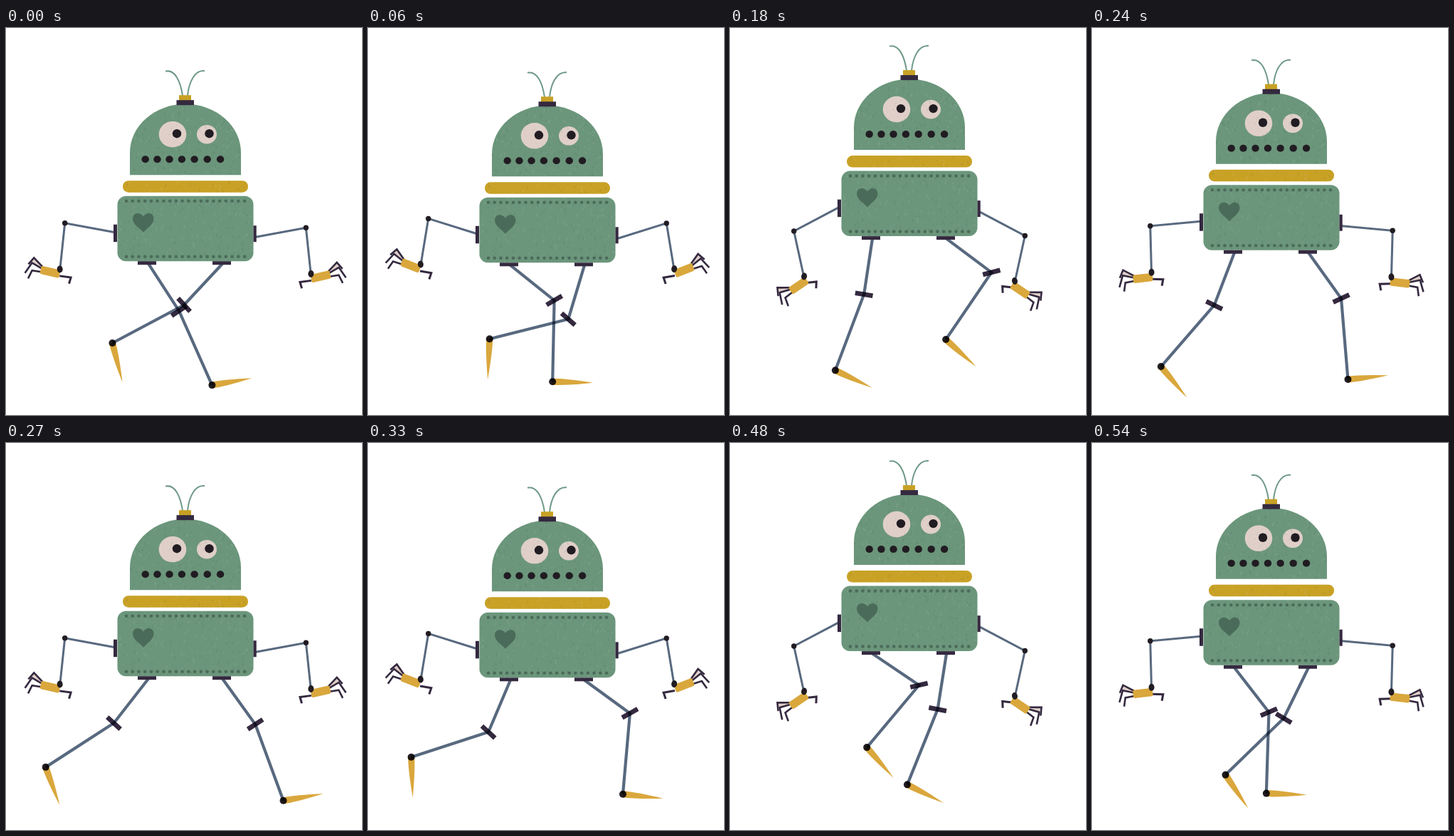
These frames come from a looping animation (500x543 px, 570 ms). An HTML page with a canvas:

```html
<!DOCTYPE html>
<html lang="en">
<head>
<meta charset="utf-8">
<title>Running robot</title>
<style>
  html, body { margin: 0; width: 100%; height: 100%; overflow: hidden; background: #fff; }
  canvas { display: block; }
</style>
</head>
<body>
<canvas id="stage" width="500" height="543"></canvas>
<script>
const ctx = document.getElementById('stage').getContext('2d');
const GREEN = '#6b967b', MOSS = '#4b6b5a', GOLD = '#c8a125', AMBER = '#d9a73c';
const PLUM = '#34293f', INK = '#211c22', STEEL = '#58697f', PALE = '#dfcfc8';
const RAD = Math.PI / 180, STEP = 30, STEPS = 19, HELD = 11, STRIDE = 18;
const THIGH = 79, SHIN = 114, FOOT = 57, UPPER_ARM = 71.5, FOREARM = 66;
const LEG_LAG = 9.3;

// Key poses of one stride, shared by both legs: step, thigh angle, shin angle.
const gait = [
  [0, 33, 24], [2.3, 54, -5], [3.3, 26, -2], [4, -6, -12], [6.3, -9, -22], [8, -21, -41],
  [9.3, -43, -62], [11, -23, -72], [12, -2, -85], [13.3, 7, -91], [15, 56, -40],
  [17.2, 36, 2], [STRIDE, 33, 24]
];

let seed = 7;
const random = () => (seed = seed * 16807 % 2147483647) / 2147483647;
const flecks = Array.from({ length: 700 }, () =>
  [150 + random() * 205, 100 + random() * 235, random() * 5 - 2.5, random() * 5]);

const wave = degrees => Math.cos(degrees * RAD);

// The body bounces and the arms swing twice per stride.
const bounce = angle => 42.9 + 22.7 * wave(angle - 39) + 3 * wave(2 * angle - 106) - 60;
const armSwing = angle => 4 + 24 * wave(angle - 233);

function legPose(step) {
  const s = step % STRIDE, i = gait.findIndex(key => key[0] > s);
  const a = gait[i - 1], b = gait[i], k = (s - a[0]) / (b[0] - a[0]);
  return [1, 2].map(j => a[j] + (b[j] - a[j]) * k);
}

function rect(color, x, y, w, h, r = 0) {
  ctx.fillStyle = color;
  ctx.beginPath();
  ctx.roundRect(x, y, w, h, r);
  ctx.fill();
}

function oval(color, x, y, rx, ry = rx) {
  ctx.fillStyle = color;
  ctx.beginPath();
  ctx.ellipse(x, y, rx, ry, 0, 0, 7);
  ctx.fill();
}

function line(color, width, ...points) {
  ctx.strokeStyle = color;
  ctx.lineWidth = width;
  ctx.beginPath();
  points.forEach(p => ctx.lineTo(...p));
  ctx.stroke();
}

function shape(color, path) {
  ctx.fillStyle = color;
  ctx.fill(new Path2D(path));
}

function at(x, y, degrees, draw) {
  ctx.save();
  ctx.translate(x, y);
  ctx.rotate(degrees * RAD);
  draw();
  ctx.restore();
}

// A point at a distance along an angle measured from straight down.
const hang = ([x, y], length, degrees) =>
  [x + length * Math.sin(degrees * RAD), y + length * wave(degrees)];

function drawBody() {
  ctx.strokeStyle = '#6f9987';
  ctx.lineWidth = 2;
  ctx.stroke(new Path2D('M248 95C245 76 238 58 224 61M255 95C257 76 265 59 279 60.5'));
  rect(GOLD, 243, 94.5, 17, 8);
  shape(GREEN, 'M174 206.5V175A78 68 0 0 1 330 175V206.5Z');
  rect(GOLD, 164, 214.5, 176, 16.5, 8);
  rect(GREEN, 156.5, 236, 191, 91.5, 12);
  oval(PALE, 234, 149.5, 19.3, 18.3);
  oval(PALE, 282, 149.5, 14, 13.3);

  ctx.globalCompositeOperation = 'source-atop';
  flecks.forEach(([x, y, dx, dy], i) =>
    line(i % 2 ? 'rgba(255,255,255,.07)' : 'rgba(0,30,20,.07)', 1.5, [x, y], [x + dx, y + dy]));
  ctx.globalCompositeOperation = 'source-over';

  oval(INK, 240, 148.5, 6.2);
  oval(INK, 285.5, 148.5, 6.2);
  for (let i = 0; i < 7; i++) oval(INK, 195.7 + i * (16.6 + i * 0.16), 184.5, 5.2, 5);
  for (let i = 0; i < 20; i++) {
    oval(MOSS, 169 + i * 8.74, 243, 2.3);
    oval(MOSS, 169 + i * 8.74, 321, 2.3);
  }
  shape(MOSS, 'M193 287C187 280 178 276 178 268C178 259 189 258 193 265C197 258 207.5 259 207.5 268C207.5 276 199 280 193 287Z');
  rect(PLUM, 239.5, 101.5, 24.5, 7);
  rect(PLUM, 151, 276, 5, 24.5);
  rect(PLUM, 347.5, 277.5, 4.2, 23);
  rect(PLUM, 185, 327.5, 26, 5);
  rect(PLUM, 290, 327.5, 26, 5);
}

function drawArm(swing) {
  const shoulder = [153, 287];
  const elbow = hang(shoulder, UPPER_ARM, swing - 90);
  const bend = swing * 0.48 - 1, turn = swing * -1.22;
  const wrist = hang(elbow, FOREARM, bend);
  line(STEEL, 3, shoulder, elbow, wrist);
  oval(INK, ...elbow, 3.7);
  at(...wrist, turn * 0.3, () => line(PLUM, 3, [0, 8.5], [16, 9.5], [14, 18.5]));
  at(...wrist, turn, () => {
    shape(PALE, 'M-25 1L-39 -8L-41 -1L-27 4Z');
    line(PLUM, 2.6, [-25, 1], [-39.3, -8.5], [-45, 2]);
    line(PLUM, 2.6, [-26, 3.5], [-40.5, -1], [-47, 15]);
    line(PLUM, 2.6, [-25, 8.5], [-38, 9.4], [-41, 21.5]);
    rect(AMBER, -26.5, 0, 27.5, 11.5, 2);
  });
  at(...wrist, bend, () => oval(INK, 0, -1, 4, 5));
}

function drawLeg(hip, [thigh, shin]) {
  const knee = hang(hip, THIGH, thigh), ankle = hang(knee, SHIN, shin);
  const foot = Math.max(-10, shin * -1.22), plate = -5 - (thigh + shin) / 2;
  at(...ankle, foot, () => shape(AMBER, `M0 -4.5Q18 -5 ${FOOT} 0Q18 5 0 4.5Z`));
  line(STEEL, 4.2, hip, knee, ankle);
  at(...knee, plate, () => rect(PLUM, -12.5, -3.3, 25, 6.6));
  oval(INK, ...ankle, 5);
}

function frame() {
  const tick = Math.floor(performance.now() / STEP) % STEPS;
  const step = tick > HELD ? tick - 1 : tick;
  const angle = step / STRIDE * 720, swing = armSwing(angle);
  ctx.clearRect(0, 0, 500, 543);

  ctx.save();
  ctx.translate(0, bounce(angle));
  ctx.globalCompositeOperation = 'multiply';
  drawLeg([200, 331], legPose(step));
  drawLeg([304, 331], legPose(step + LEG_LAG));
  ctx.globalCompositeOperation = 'source-over';
  drawArm(swing);
  at(504, 6.5, 0, () => {
    ctx.scale(-1, 1);
    drawArm(swing);
  });
  drawBody();
  ctx.restore();
  requestAnimationFrame(frame);
}
frame();
</script>
</body>
</html>
```
